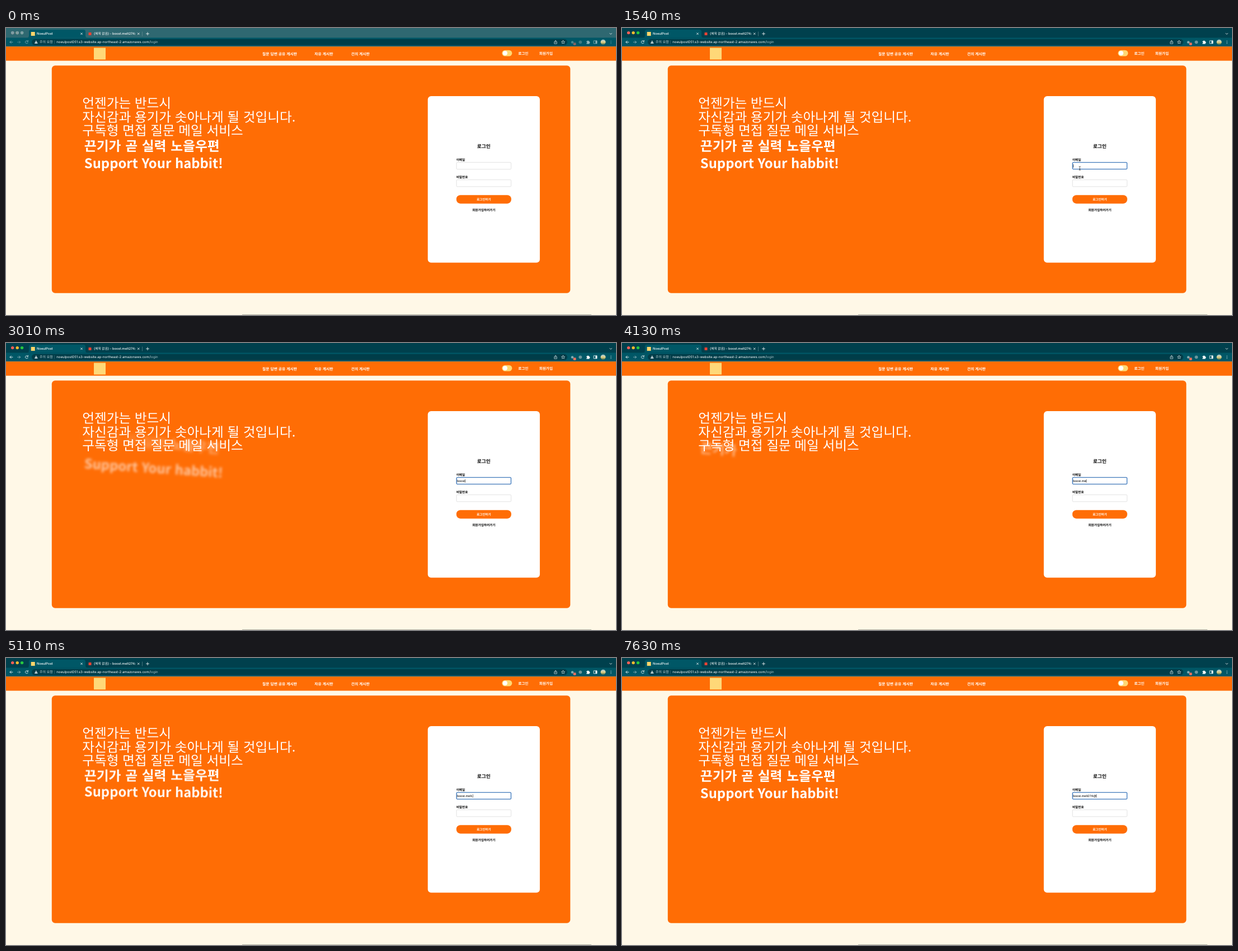
Animation of 1090 by 514 pixels, one loop 8000 ms. Source, as an HTML page:

```html
<!DOCTYPE html>
<html lang="ko">
<head>
<meta charset="utf-8">
<title>NoeulPost</title>
<style>
  html, body { margin: 0; width: 100%; height: 100%; overflow: hidden; background: #fff8e7; }
  svg { display: block; width: 1090px; height: 514px; }
  text { font-family: "Noto Sans CJK KR", "Noto Sans CJK", sans-serif; text-rendering: geometricPrecision; white-space: pre; }
  .ui { font-family: Inter, "Noto Sans CJK KR", sans-serif; fill: #fff; }
  .nav { font-size: 6.8px; font-weight: 700; fill: #fff; }
  .hero { font-size: 23.65px; fill: #fff; }
  .form { font-size: 5.6px; font-weight: 700; fill: #000; }
  .mid { text-anchor: middle; }
  .line { fill: none; stroke: #fff; stroke-width: .8; stroke-linecap: round; stroke-linejoin: round; }
  .input { fill: #fff; stroke: #cfcfcf; stroke-width: .6; }

  .strip { fill: #00404d; animation: strip 8s linear infinite; }
  .icons { animation: wake 8s linear infinite; }
  .lights { fill: #7d9da4; animation: sleep 8s linear infinite; }
  @keyframes strip { 0%, 11% { fill: #2f6871; } 14% { fill: #00404d; } }
  @keyframes wake { 0%, 11% { opacity: .55; } 14% { opacity: 1; } }
  @keyframes sleep { 0%, 11% { opacity: 1; } 14%, 100% { opacity: 0; } }

  /* Words drift up and blur away, then settle back one after another. */
  .word {
    font-size: 23.8px; font-weight: 700; fill: #fff;
    transform-box: fill-box; transform-origin: center;
    animation: word 8s linear calc(var(--i) * 88ms) infinite backwards;
  }
  @keyframes word {
    0%, 31.375% {
      opacity: 1; transform: translateY(0) rotate(0); filter: none;
      animation-timing-function: cubic-bezier(.22, 1, .36, 1);
    }
    50.75% { opacity: 0; transform: translateY(-47px) rotate(10deg); filter: blur(5px); }
    51.6% {
      opacity: .53; transform: translateY(-21px) rotate(4.6deg); filter: blur(2.2px);
      animation-timing-function: cubic-bezier(.22, 1, .36, 1);
    }
    72.9%, 100% { opacity: 1; transform: translateY(0) rotate(0); filter: none; }
  }

  .ring { fill: none; stroke: #1a62b4; stroke-width: 1.1; animation: ring 8s linear infinite; }
  @keyframes ring { 0%, 17.2% { opacity: 0; } 19.2%, 100% { opacity: 1; } }
  .ibeam { animation: ibeam 8s step-end infinite; }
  @keyframes ibeam { 0% { opacity: 0; } 15.7% { opacity: 1; } 29.7%, 100% { opacity: 0; } }
  #typed { font: 5.7px "Liberation Sans", Arial, sans-serif; fill: #000; }
</style>
</head>
<body>
<svg viewBox="0 0 1090 514">
  <defs>
    <linearGradient id="photo" x2="0" y2="1">
      <stop offset=".1" stop-color="#a9c8c9"/>
      <stop offset=".5" stop-color="#e6d58b"/>
      <stop offset="1" stop-color="#507044"/>
    </linearGradient>
    <linearGradient id="fade">
      <stop offset=".8" stop-color="#fff"/>
      <stop offset="1" stop-color="#fff" stop-opacity=".1"/>
    </linearGradient>
    <clipPath id="tabClip"><rect x="156" width="75" height="17"/></clipPath>
  </defs>

  <!-- Tab strip -->
  <rect class="strip" width="1090" height="18"/>
  <path d="M37 17.5Q41 17.5 41 13.5V6.5Q41 3 44.5 3H138.5Q142 3 142 6.5V13.5Q142 17.5 146 17.5Z" fill="#005766"/>
  <g>
    <circle cx="11.7" cy="8.6" r="2.7" fill="#ff5f57"/>
    <circle cx="20.2" cy="8.6" r="2.7" fill="#febc2e"/>
    <circle cx="28.6" cy="8.6" r="2.7" fill="#28c840"/>
  </g>
  <g class="lights">
    <circle cx="11.7" cy="8.6" r="2.8"/>
    <circle cx="20.2" cy="8.6" r="2.8"/>
    <circle cx="28.6" cy="8.6" r="2.8"/>
  </g>
  <rect x="44.7" y="7" width="7" height="7" fill="#ffd56b"/>
  <text class="ui" x="55" y="12.2" font-size="5.8" font-weight="500">NoeulPost</text>
  <rect x="147.5" y="8" width="5" height="5" fill="#ea4335"/>
  <text class="ui" x="157" y="12.2" font-size="5.8" font-weight="500" style="fill:url(#fade)" clip-path="url(#tabClip)">(제목 없음) - boost.melt274@no</text>
  <path class="line" d="M133.5 8.8l3 3m0-3l-3 3M235.2 8.8l3 3m0-3l-3 3M250.5 10.3h5m-2.5-2.5v5M1078.8 9.5l1.8 1.8 1.8-1.8"/>
  <path d="M243.5 6.5v8" stroke="#6f949b" stroke-width=".6"/>

  <!-- Toolbar -->
  <rect y="17.4" width="1090" height="15.8" fill="#005766"/>
  <rect x="46" y="19.8" width="957" height="11" rx="5.5" fill="#003d49"/>
  <g class="icons">
    <path class="line" d="M12 25.3H7m2.3-2.3L7 25.3l2.3 2.3M39.1 23.8a2.5 2.5 0 1 0 .2 2.5M39.4 22.3v1.9h-1.9"/>
    <path class="line" opacity=".6" d="M20.5 25.3h5m-2.3-2.3l2.3 2.3-2.3 2.3"/>
    <path d="M1037.3 23.5h1.5a1.1 1.1 0 0 1 2.2 0h1.5v1.4a1.1 1.1 0 0 1 0 2.2v1.4h-5.2v-1.4a1.1 1.1 0 0 0 0-2.2z" fill="#fff"/>
    <path class="line" d="M1050.5 22.8h5.5v5h-5.5z"/>
    <rect x="1053.4" y="22.8" width="2.6" height="5" fill="#fff"/>
    <circle cx="1026.3" cy="25.3" r="2.9" fill="#6c969c"/>
    <circle cx="1012" cy="25.5" r="2.3" fill="#83aab0"/>
    <rect x="1013.7" y="26.3" width="4.8" height="4.8" rx="1" fill="#e8705f"/>
    <g fill="#fff">
      <circle cx="1081" cy="23" r=".6"/><circle cx="1081" cy="25.3" r=".6"/><circle cx="1081" cy="27.6" r=".6"/>
    </g>
  </g>
  <g class="line" style="stroke-width:.6">
    <path d="M980.7 24.7h-1v3.5h4.6v-3.5h-1M982 26.5v-4.2m-1.3 1.3l1.3-1.3 1.3 1.3"/>
    <path d="M995.5 22.3l.9 2 2.1.2-1.6 1.4.5 2.1-1.9-1.1-1.9 1.1.5-2.1-1.6-1.4 2.1-.2z"/>
  </g>
  <circle cx="1067" cy="25.3" r="4.5" fill="url(#photo)"/>
  <path d="M53.8 22.3l2.9 5.4h-5.8z" fill="#dfeaec"/>
  <path d="M53.8 24v1.7m0 .7v.6" stroke="#003d49" stroke-width=".7"/>
  <text class="ui" x="60" y="27.4" font-size="6" style="fill:#c3d5d8">주의 요함</text>
  <path d="M86.3 22v6.6" stroke="#5c858d" stroke-width=".5"/>
  <text class="ui" x="90.3" y="27.4" font-size="6">noeulpost051.s3-website.ap-northeast-2.amazonaws.com<tspan fill="#a9c3c8">/login</tspan></text>

  <!-- Page header -->
  <rect y="33.2" width="1090" height="25.4" fill="#ff6d05"/>
  <rect x="157" y="35.5" width="21" height="21" fill="#ffd878"/>
  <g class="nav">
    <text x="458" y="48.8">질문 답변 공유 게시판</text>
    <text x="551.3" y="48.8">자유 게시판</text>
    <text x="616.7" y="48.8">건의 게시판</text>
    <text x="915.2" y="47.9" font-size="6.6">로그인</text>
    <text x="952.7" y="47.9" font-size="6.6">회원가입</text>
  </g>
  <rect x="886.3" y="39.8" width="18" height="10.7" rx="5.35" fill="#ffd873"/>
  <circle cx="891.8" cy="45.1" r="4.1" fill="#fff"/>

  <!-- Hero -->
  <rect x="81.8" y="67.3" width="926.5" height="407.5" rx="6" fill="#ff6d05"/>
  <g class="hero">
    <text x="136.2" y="143.4">언젠가는 반드시</text>
    <text x="136.2" y="167.7">자신감과 용기가 솟아나게 될 것입니다.</text>
    <text x="136.2" y="192">구독형 면접 질문 메일 서비스</text>
  </g>
  <text class="word" style="--i:0" x="139.8" y="219.8">끈기가</text>
  <text class="word" style="--i:1" x="213.2" y="219.8">곧</text>
  <text class="word" style="--i:2" x="242.7" y="219.8">실력</text>
  <text class="word" style="--i:3" x="294.2" y="219.8">노을우편</text>
  <text class="word" style="--i:4" x="139.8" y="251">Support Your habbit!</text>

  <!-- Login card -->
  <rect x="753.7" y="122" width="200.2" height="298.2" rx="6" fill="#fff"/>
  <g class="form">
    <text class="mid" x="853.8" y="214.6" style="font-size:8.7px">로그인</text>
    <text x="804.7" y="238">이메일</text>
    <text x="804.7" y="269">비밀번호</text>
    <text class="mid" x="853.8" y="328.1">회원가입하러가기</text>
  </g>
  <rect class="input" x="805" y="240.7" width="97.5" height="12.3" rx="1.5"/>
  <rect class="input" x="805" y="271.8" width="97.5" height="12.3" rx="1.5"/>
  <rect class="ring" x="805.1" y="240.8" width="97.3" height="12" rx="1.5"/>
  <text id="typed" x="806" y="249"></text>
  <rect id="caret" y="244.2" width=".6" height="5.8"/>
  <path class="ibeam" d="M816.3 247.8q1.7 0 1.7 1 0-1 1.7-1M818 248.5v5.5M816.3 254.8q1.7 0 1.7-1 0 1 1.7 1M817.2 252.4h1.6" fill="none" stroke="#111" stroke-width=".6"/>
  <rect x="804.8" y="299.2" width="98" height="15.2" rx="7" fill="#ff6d05"/>
  <text class="form mid" x="853.8" y="308.9" style="fill:#fff">로그인하기</text>

  <rect x="422" y="513.3" width="624" height=".7" fill="#8b8b80"/>
</svg>
<script>
  const LOOP = 8000, BLINK = 560;
  const mail = 'boost.melt274@';
  // [time, letters shown, optional extra text]; each entry restarts the caret blink.
  const keys = [
    [1400, 0], [2380, 1], [2520, 2], [2630, 3], [2750, 4], [2870, 5],
    [3710, 6], [3920, 7], [4120, 8], [4270, 9], [4410, 10],
    [4970, 10, '.'], [5880, 10], [6020, 10],
    [7140, 11], [7210, 12], [7350, 13], [7630, 14]
  ];
  const typed = document.getElementById('typed');
  const caret = document.getElementById('caret');
  let start;

  function draw(now) {
    start ??= now;
    const t = (now - start) % LOOP;
    const key = keys.findLast(k => k[0] <= t);
    const text = key ? mail.slice(0, key[1]) + (key[2] || '') : '';
    if (typed.textContent !== text) typed.textContent = text;
    const on = key && Math.floor((t - key[0]) / BLINK) % 2 === 0;
    caret.style.visibility = on ? 'visible' : 'hidden';
    caret.setAttribute('x', 806 + (text ? typed.getComputedTextLength() : 0));
    requestAnimationFrame(draw);
  }
  requestAnimationFrame(draw);
</script>
</body>
</html>
```
